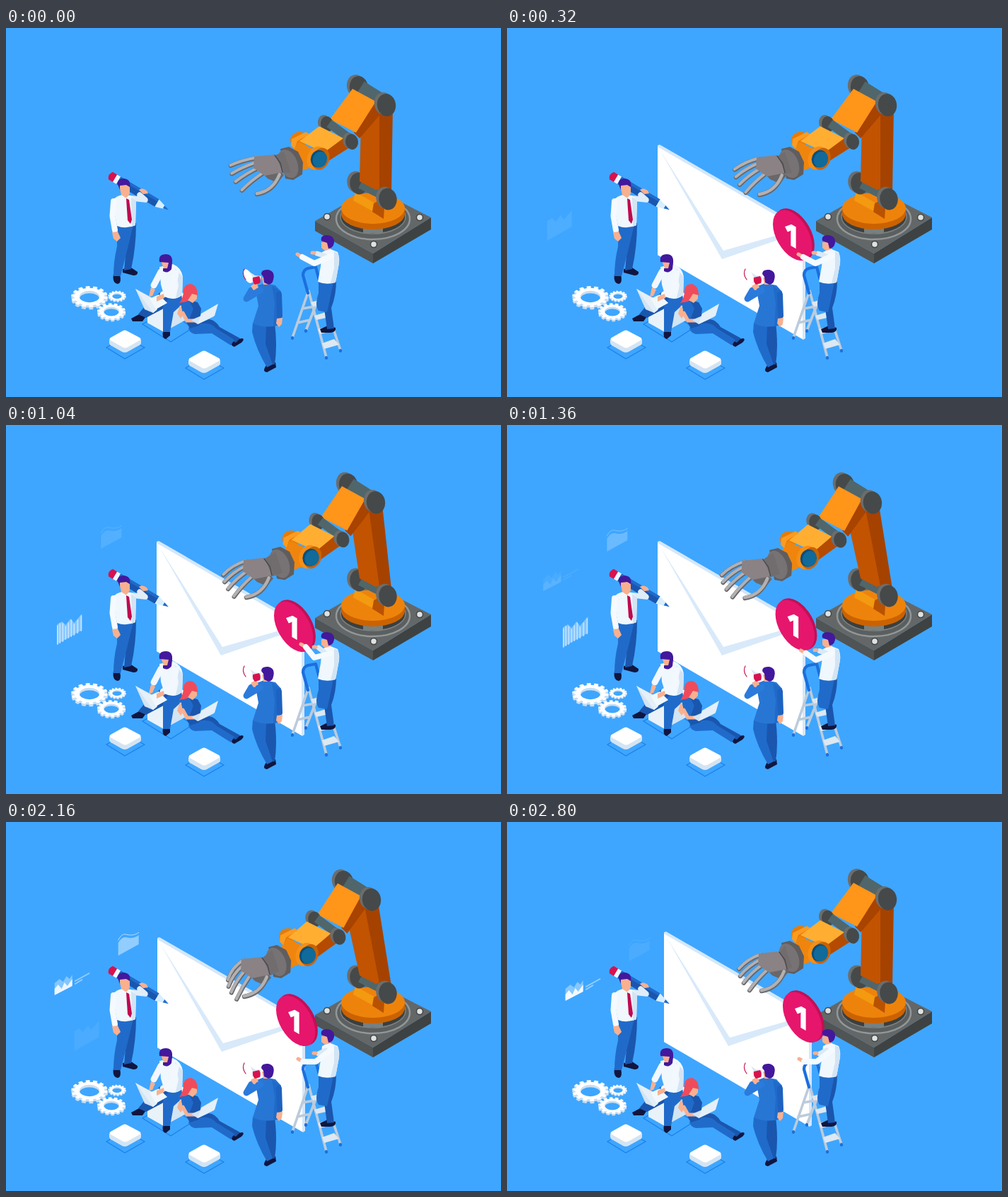
An HTML page that plays this animation: 700 by 522 pixels, repeating every 8 s.

```html
<!DOCTYPE html>
<html lang="en">
<head>
<meta charset="utf-8">
<title>Isometric mail team</title>
<style>
  html, body { margin: 0; height: 100%; overflow: hidden; background: #3ea6ff; }
  svg { display: block; width: 100%; height: 100%; }
  .skin { fill: #f9b08f; } .hair { fill: #43189c; } .red { fill: #f04b5b; }
  .shirt { fill: #f0f8fd; } .fold { fill: #d3e4f3; }
  .jean { fill: #206bca; } .deep { fill: #1a56ae; } .shoe { fill: #10163f; }
  .pink { fill: #d8124f; }
  .line { fill: none; stroke-linecap: round; stroke-linejoin: round; }
  .floor { fill: none; stroke: #1a80ea; stroke-width: 1.2; }
  .rail { stroke: #bccbdb; stroke-width: 3.6; }
  .one { font: 800 43px "Open Sans", "Noto Sans", sans-serif; fill: #fff; text-anchor: middle; }
</style>
</head>
<body>
<svg viewBox="0 0 700 522">
  <defs>
    <g id="cog" fill="none">
      <circle r="7.9" stroke-width="3.2"/>
      <circle r="10.2" stroke-width="2.6" pathLength="28" stroke-dasharray="1.1 .9"/>
    </g>
    <g id="gear">
      <use href="#cog" y="2.6" stroke="#c9def1"/>
      <use href="#cog" y="1.3" stroke="#c9def1"/>
      <use href="#cog" stroke="#fff"/>
    </g>
    <g id="tile">
      <path class="floor" d="M142 452L168 437L196 452L168 468z"/>
      <path class="fold" d="M146 441V446Q147 449 150 450L164 458Q168 460 172 458L188 449Q191 448 191 445V441z"/>
      <path fill="#fff" d="M148 438L164 429Q168 426 172 429L189 438Q192 440 189 442L173 451Q168 454 164 451L148 442Q145 440 148 438z"/>
    </g>
  </defs>

  <g id="charts" fill="#fff">
    <g>
      <path opacity=".5" d="M88 319V291L95 287L100 292L107 283L112 289L123 276V299z"/>
      <path id="bars" class="line" stroke="#fff" stroke-width="1.7" d="M88.500 319V293M92 317V290M96 315V290M100 312V294M104 310V289M108 308V285M112 306V291M117 303V285M122 300V279"/>
    </g>
    <g>
      <path opacity=".75" d="M150 184V166Q155 157 161 158Q171 161 179 155V168z"/>
      <path class="line" stroke="#fff" d="M150 162Q155 152 161 154Q171 157 179 151.500"/>
    </g>
    <g>
      <path opacity=".4" d="M60 239V223L67 217L72 221L77 213L81 217L85 211V226z"/>
      <path d="M60 240V231L65 225L70 231L74 222L78 227L85 217V227z"/>
      <path class="line" opacity=".5" stroke="#fff" stroke-width="1.6" d="M89 220L109 209M89 224L99 218"/>
    </g>
  </g>

  <g id="envelope">
    <path fill="#d4e7fa" d="M213 166L216 165L422 284V439L419 441L213 321z"/>
    <path fill="#fff" d="M213 168L418 287V440L213 321z"/>
    <path fill="#d8e9fa" d="M217 174L306 315L400 288V294L304 327z"/>
  </g>

  <g id="base">
    <path fill="#505454" d="M437 273L519 319V333L437 287z"/>
    <path fill="#3e4242" d="M519 319L601 268V285L519 333z"/>
    <path fill="#646767" d="M437 273L519 226L601 268L519 319z"/>
    <ellipse cx="519" cy="270" rx="52" ry="29" fill="#5b5f5f" stroke="#929798" stroke-width="2.500"/>
    <ellipse cx="519" cy="267" rx="46" ry="24" fill="#3b3f3f" stroke="#7b8081" stroke-width="1.500"/>
    <path fill="#77807f" d="M505 280H533V290H505z"/>
    <path fill="#cb6200" d="M474 255V263A45 22 0 0 0 564 263V255z"/>
    <ellipse cx="519" cy="255" rx="45" ry="22" fill="#ee830c"/>
    <g stroke="#414546" stroke-width="1.500" fill="#dfe2e2">
      <circle cx="454" cy="267" r="4.500"/><circle cx="585" cy="268" r="4.500"/><circle cx="520" cy="306" r="4.500"/>
    </g>
  </g>
  <g id="robot"></g>

  <g id="badge">
    <g transform="matrix(.866 .5 0 1 0 0)">
      <circle cx="2" cy="-2.500" r="32.500" fill="#c50e55"/>
      <circle cx="-1.500" cy="1" r="32" fill="#e6166c"/>
      <text class="one" x="-3" y="17">1</text>
    </g>
  </g>

  <!-- gears and tiles -->
  <use href="#gear" transform="translate(118 380) scale(2.25 1.3)"/>
  <use href="#gear" transform="translate(157 379) scale(1.1 .64)"/>
  <use href="#gear" transform="translate(149 401) scale(1.75 1.02)"/>
  <use href="#tile"/>
  <use href="#tile" x="112" y="29"/>

  <!-- man with pencil -->
  <g>
    <g transform="translate(148 209) rotate(30.5)">
      <path class="pink" d="M0 -6H8V6H0Q-5 0 0 -6z"/>
      <path class="shirt" d="M7 -6H13V6H7z"/>
      <path class="deep" d="M13 -6H76V6H13z"/>
      <path class="jean" d="M13 -6H76V-2H13z"/>
      <path fill="#d7efff" d="M76 -6L89 -2V2L76 6z"/>
      <path class="jean" d="M87 -2.500L95 0L87 2.500z"/>
    </g>
    <path class="shoe" d="M152 348L161 349Q164 361 158 362Q150 361 152 348zM165 341L177 339L186 345Q187 350 180 350L165 346z"/>
    <path class="deep" d="M167 278L184 276Q184 310 177 341L167 343L170 310z"/>
    <path class="jean" d="M157 278L180 278Q174 305 162 351L152 351Q152 330 157 309z"/>
    <path class="line" stroke="#e0edf8" stroke-width="7.5" d="M179 241L197 243L189 236"/>
    <path class="skin" d="M188 229Q192 225 199 230L201 234L194 235z"/>
    <path class="shirt" d="M150 244Q157 237 164 236L177 237L184 244L183 279Q169 285 157 280z"/>
    <path class="fold" d="M177 239L184 244L183 279L178 281z"/>
    <path class="line" stroke="#f5fafe" stroke-width="8" d="M152 245L150.500 266L154 286"/>
    <path class="skin" d="M150 289L158 288L162 297L157 302L152 298z"/>
    <path class="skin" d="M160 222H175V234Q171 241 169 240L163 236z"/>
    <path fill="#c0094e" d="M170 241L174 243L178 271L176 277L172 272z"/>
    <path class="hair" d="M158 221Q157 213 167 213Q177 214 175 225L170 222L161 223L161 229z"/>
  </g>

  <!-- bearded man on the box -->
  <g>
    <path class="floor" d="M193 419L228 400L264 424L233 444z"/>
    <path fill="#fff" d="M200 387L236 366L258 380L223 400z"/>
    <path fill="#e9f2f9" d="M200 387L223 400V430L200 417z"/>
    <path class="fold" d="M223 400L258 380V411L223 430z"/>
    <path class="shoe" d="M177 411L190 404L198 408L193 415H179zM222 429L232 427L232 435L226 440Q220 439 222 429z"/>
    <path class="deep" d="M237 370L218 374L196 394L187 405L198 410L230 393z"/>
    <path class="jean" d="M248 376L231 382Q222 388 222 397L222 430L232 430L237 402L250 390z"/>
    <path class="shirt" d="M217 338L236 334Q248 339 250 352L249 378Q238 387 224 380L219 363z"/>
    <path class="fold" d="M239 340L250 352L249 378L240 382L244 364z"/>
    <path class="line" stroke="#f2f8fd" stroke-width="9" d="M219 345L209 364M240 347L235 371L222 377"/>
    <path class="fold" d="M183 369L200 380L213 399L208 403L196 398z"/>
    <path fill="#e4eff8" d="M183 369L207 382L214 398L208 403z"/>
    <path class="shirt" d="M203 383L216 377L228 389L212 398z"/>
    <path class="skin" d="M205 367L211 370L207 379L202 380zM213 380L223 376L224 382L213 387z"/>
    <path class="skin" d="M219 329H233V341L224 343z"/>
    <path class="hair" d="M217 331Q215 320 226 320Q236 320 235 332L234 341Q229 348 222 344L222 340L228 340L230 332z"/>
  </g>

  <!-- woman with laptop -->
  <g>
    <path class="shoe" d="M319 442L334 439Q338 440 333 445L323 451Q317 450 319 442z"/>
    <path class="deep" d="M259 424L287 412Q296 413 302 423L331 439L325 445L292 431z"/>
    <path class="jean" d="M258 424L276 418Q290 416 297 425L323 441L318 449L291 432L267 433Q259 431 258 424z"/>
    <path class="skin" d="M246 392L252 404L247 411L242 404z"/>
    <path class="deep" d="M247 389L259 385L271 388L276 397L273 421L260 425L252 411z"/>
    <path class="jean" d="M247 389L259 386L265 397L258 416L250 404z"/>
    <path class="line" stroke="#f9b08f" stroke-width="5" d="M250 403L256 414L270 414"/>
    <path class="fold" d="M262 413L271 419L294 408L288 402z"/>
    <path fill="#e4eff8" d="M276 404L300 390L295 407L271 419z"/>
    <path class="skin" d="M256 374H270V383L264 389L257 385z"/>
    <path class="red" d="M251 374Q250 363 261 362Q271 364 271 378L263 376L256 387L245 389Q250 383 251 374z"/>
  </g>

  <!-- man with megaphone -->
  <g>
    <path class="shoe" d="M369 476L381 473L382 480L369 487Q361 486 369 476z"/>
    <path class="deep" d="M364 417L380 417Q384 450 380 476L369 476L366 445z"/>
    <path class="jean" d="M349 417L368 420L367 447L377 476L369 480Q354 455 348 430z"/>
    <path fill="#2876d4" d="M352 366L365 361L381 364L389 373L387 420Q367 426 349 418L357 393z"/>
    <path class="jean" d="M376 364L389 373L387 420L378 422L380 390z"/>
    <path class="line" stroke="#1d62c0" stroke-width="8" d="M386 377L387 407"/>
    <path class="line" stroke="#2a7bdc" stroke-width="9" d="M360 371L340 383L347 371"/>
    <path class="skin" d="M383 411L391 410L390 419L386 423L382 418z"/>
    <path class="skin" d="M346 365L354 360L357 367L350 371zM362 353H372V363L364 363z"/>
    <path class="hair" d="M361 348Q361 341 371 342Q381 344 378 356Q377 362 371 363L365 360L364 352z"/>
    <path fill="#dbe7f2" d="M338 341L352 350L361 351L360 357L345 361z"/>
    <ellipse fill="#fff" cx="342" cy="351" rx="5.500" ry="10.500" transform="rotate(-28 342 351)"/>
    <path class="line" stroke="#c2124f" stroke-width="1.200" d="M337 341Q333 348 339 356"/>
    <path class="pink" d="M349 353L358 351Q361 356 359 361L352 363Q348 359 349 353z"/>
  </g>

  <!-- man on the ladder -->
  <g>
    <path class="line rail" d="M427 374L405 438M446 372L424 428M412 417L430 413M419 397L436 394"/>
    <path class="line rail" d="M428 372L453 466M446 374L473 456"/>
    <path fill="#dde8f2" d="M431 388L446 384L450 391L434 394zM436 407L452 402L457 409L439 413zM441 426L459 421L465 428L444 433zM447 446L464 440L471 448L450 454z"/>
    <path class="line" stroke="#1b6fde" stroke-width="4.200" d="M427 375L420 350Q420 342 427 340L438 338L448 376M405 438V439M424 428V429M453 466V467M473 456V457"/>
    <path class="shoe" d="M444 426L455 421L466 424Q467 430 459 431L446 431z"/>
    <path class="deep" d="M449 358L467 357Q467 378 460 396L464 425L454 426L450 397z"/>
    <path class="jean" d="M442 357L463 359L457 389L454 402L442 400Q436 392 442 375z"/>
    <path class="shirt" d="M447 317L457 312L469 317Q473 327 470 338L466 360Q453 364 441 359L445 337z"/>
    <path class="fold" d="M464 316L470 319L471 333L466 360L459 361L464 340z"/>
    <g id="arms"></g>
    <path class="skin" d="M446 303H459V313L451 315L446 311z"/>
    <path class="hair" d="M446 301Q444 293 454 293Q465 294 464 304Q462 312 456 312L454 304z"/>
  </g>
</svg>

<script>
const LOOP = 8000, STEP = 80, REST = 2800;
const $ = id => document.getElementById(id);

// Smooth interpolation through [time, value] pairs, flat at turning points.
function track(t, keys) {
  const slope = i => {
    const [a, b, c] = [keys[i - 1], keys[i], keys[i + 1]];
    if (!a || !c || (b[1] - a[1]) * (c[1] - b[1]) <= 0) return 0;
    return (c[1] - a[1]) / (c[0] - a[0]);
  };
  if (t <= keys[0][0]) return keys[0][1];
  const i = keys.findIndex(k => k[0] >= t);
  if (i < 0) return keys[keys.length - 1][1];
  const [t0, v0] = keys[i - 1], [t1, v1] = keys[i];
  const d = t1 - t0, u = (t - t0) / d, s = u * u * (3 - 2 * u);
  return v0 + (v1 - v0) * s + d * u * (1 - u) * ((1 - u) * slope(i - 1) - u * slope(i));
}
const times = [0, 320, 640, 1040, 1760, 2160, 2800];
const pose = (t, ...values) => track(t, values.map((v, i) => [times[i], v]));

const at = ([dx, dy], ...p) => {
  const points = [];
  for (let i = 0; i < p.length; i += 2) points.push([p[i] + dx, p[i + 1] + dy]);
  return points;
};
const poly = (fill, ...points) => `<path fill="${fill}" d="M${points.join("L")}z"/>`;
const line = (color, width, points) =>
  `<path class="line" stroke="${color}" stroke-width="${width}" d="M${points.join("L")}"/>`;
const curve = (color, width, [a, b, c]) =>
  `<path class="line" stroke="${color}" stroke-width="${width}" d="M${a}Q${b} ${c}"/>`;
const oval = (fill, [x, y], rx, ry, tilt = 0) =>
  `<ellipse fill="${fill}" rx="${rx}" ry="${ry}" transform="translate(${x} ${y}) rotate(${tilt})"/>`;
const disc = ([x, y], r) =>
  oval("#6c6d6d", [x - 2, y - 1], r * .82, r, -8) + oval("#464949", [x + 2, y + 1], r * .82, r, -8);
// Rear disc and axle; the front disc goes on after the parts between.
const axle = (from, to, r) => disc(from, r) +
  `<path stroke="#50666a" stroke-width="${r * 1.1}" d="M${from[0] + 5} ${from[1]}L${to[0] - 4} ${to[1] - 6}"/>`;

function hand(palm, curl) {
  const bases = at(palm, 354, 184, 354, 191, 357, 198, 363, 206);
  const step = ([x, y], length, degrees) => {
    const angle = degrees * Math.PI / 180;
    return [x - length * Math.cos(angle), y + length * Math.sin(angle)];
  };
  const digit = (points, width) => curve("#67676a", width, points) +
    curve("#b3b0b2", width - 2, points.map(([x, y]) => [x - .3, y - .8]));
  let out = "";
  bases.forEach((base, i) => {
    const mid = step(base, 20, 10 + 8 * i + curl * (7 + 2 * curl));
    const tip = step(mid, 18, 24 + 7 * i + curl * (25 - 5 * i));
    out += digit([base, mid, tip], 6);
  });
  return out + poly("#6a6769", ...at(palm, 364, 207, 385, 199, 393, 208, 384, 219, 370, 213)) +
    digit(at(palm, 387, 208, 378, 231, 355, 235), 6.5) +
    poly("#8a8285", ...at(palm, 351, 182, 379, 179, 388, 191, 391, 204, 366, 209, 350, 198));
}

function robot(t) {
  const a = pose(t, 0, 0, .13, .6, 1, .84, 0);
  const top = [-25 * a, a], elbow = [-21 * a, 2 * a], clamp = [-19 * a, 4 * a], wrist = [-20 * a, 7 * a];
  const palm = [pose(t, 0, 2, -5, -15, -20, -18, 5), pose(t, 0, 1, 8, 9, 11, 12, 4)];
  const [topRear, topFront] = at(top, 497, 83, 536, 108);
  const [elbowRear, elbowFront] = at(elbow, 452, 135, 487, 160);
  return poly("#f39a11", [494, 232], [524, 249], [520, 260], [491, 244]) +
    poly("#b95200", [520, 248], [536, 240], [534, 270], [518, 260]) +
    axle([497, 219], [538, 241], 15.5) +
    poly("#c25300", ...at(top, 502, 130, 530, 112), [529, 227], [523, 229], [500, 217]) +
    poly("#a54200", ...at(top, 528, 118, 547, 112), [545, 232], [528, 228]) +
    disc([538, 241], 15.5) +
    axle(topRear, topFront, 16) +
    poly("#a84300", ...at(top, 521, 104, 532, 118, 526, 126), ...at(elbow, 500, 156, 492, 148)) +
    poly("#ff9519", ...at(top, 490, 86, 523, 104), ...at(elbow, 495, 148, 458, 129)) +
    disc(topFront, 16) +
    axle(elbowRear, elbowFront, 11) +
    oval("#e67b08", at(clamp, 414, 158)[0], 12, 11, -20) +
    poly("#b44b00", ...at(elbow, 476, 154, 486, 169), ...at(clamp, 456, 188, 447, 174)) +
    poly("#ffae32", ...at(elbow, 443, 139, 477, 156), ...at(clamp, 450, 176, 415, 160)) +
    disc(elbowFront, 11) +
    poly("#ef850d", ...at(clamp, 414, 161, 434, 171, 432, 197), ...at(wrist, 414, 203, 404, 174)) +
    poly("#fb9b20", ...at(clamp, 404, 157, 424, 147, 429, 150, 412, 160, 408, 171, 403, 166)) +
    oval("#f68f16", at(clamp, 439, 184)[0], 13, 17, 22) +
    oval("#cb6200", at(clamp, 445, 185)[0], 12, 16, 22) +
    oval("#0a4f7d", at(clamp, 442, 185)[0], 11, 12.5, 22) +
    oval("#106a9a", at(clamp, 444, 186)[0], 10, 11.5, 22) +
    poly("#605d5f", ...at(wrist, 388, 171, 400, 168, 413, 175, 420, 190, 419, 207, 406, 215, 395, 213)) +
    oval("#777375", at(wrist, 399, 192)[0], 13, 21, -22) +
    hand(palm, pose(t, 0, .5, .8, .9, .8, 2, 1)) +
    poly("#716d6f", ...at(palm, 381, 180), ...at(wrist, 393, 175, 403, 205), ...at(palm, 392, 205)) +
    line("#484749", 1.3, at(palm, 380, 180, 388, 191, 391, 204));
}

function arms(t) {
  const drop = track(t, [[1200, 0], [1600, 1]]);
  const lift = pose(t, 0, 0, 0, 1, 1, 1, 1);
  const near = [412 + 5 * lift - 4 * drop, 320 - 10 * lift + 25 * drop];
  const far = [433 + 2 * lift, 318 - 4 * lift + 13 * drop];
  const bend = [436 + 2 * drop, 333 - 4 * lift + 10 * drop];
  const cuff = [near[0] + 7, near[1] + 4];
  return line("#dce9f5", 7, [[452, 323], [far[0] + 7, far[1] + 1]]) +
    line("#f9b08f", 5, [[far[0] + 3, far[1]], far]) +
    line("#f9b08f", 5, [cuff, near]) +
    line("#f5fafe", 8, [[459, 323], bend, cuff]);
}

function draw(t) {
  const begun = t >= STEP;
  const drift = (t - 1760) / 1840;
  const envelope = [pose(t, 0, 0, 0, 0, 0, 1, 9), pose(t, 0, 0, -1, -1, -1, -2, -10)];
  const badge = [pose(t, 405, 405, 405, 408, 409, 411, 419), pose(t, 293, 293, 293, 285, 282, 281, 276)];
  const fades = [
    pose(t, 0, .16, .45, .7, .55, .12, 0),
    pose(t, 0, 0, 0, .14, .5, .58, .09),
    pose(t, 0, 0, 0, 0, .5, .9, .95)
  ];
  $("charts").setAttribute("transform", `translate(${40 * drift} ${23 * drift})`);
  [...$("charts").children].forEach((chart, i) => chart.setAttribute("opacity", fades[i]));
  $("bars").setAttribute("opacity", Math.max(0, Math.min(1, 3 * fades[0] - .5)));
  for (const [id, place] of [["envelope", envelope], ["badge", badge]]) {
    $(id).setAttribute("transform", `translate(${place})`);
    $(id).setAttribute("visibility", begun ? "visible" : "hidden");
  }
  $("robot").innerHTML = robot(t);
  $("arms").innerHTML = arms(t);
}

const start = performance.now();
function frame() {
  const t = (performance.now() - start) % LOOP;
  draw(Math.min(REST, Math.floor(t / STEP) * STEP));
  requestAnimationFrame(frame);
}
frame();
</script>
</body>
</html>
```
